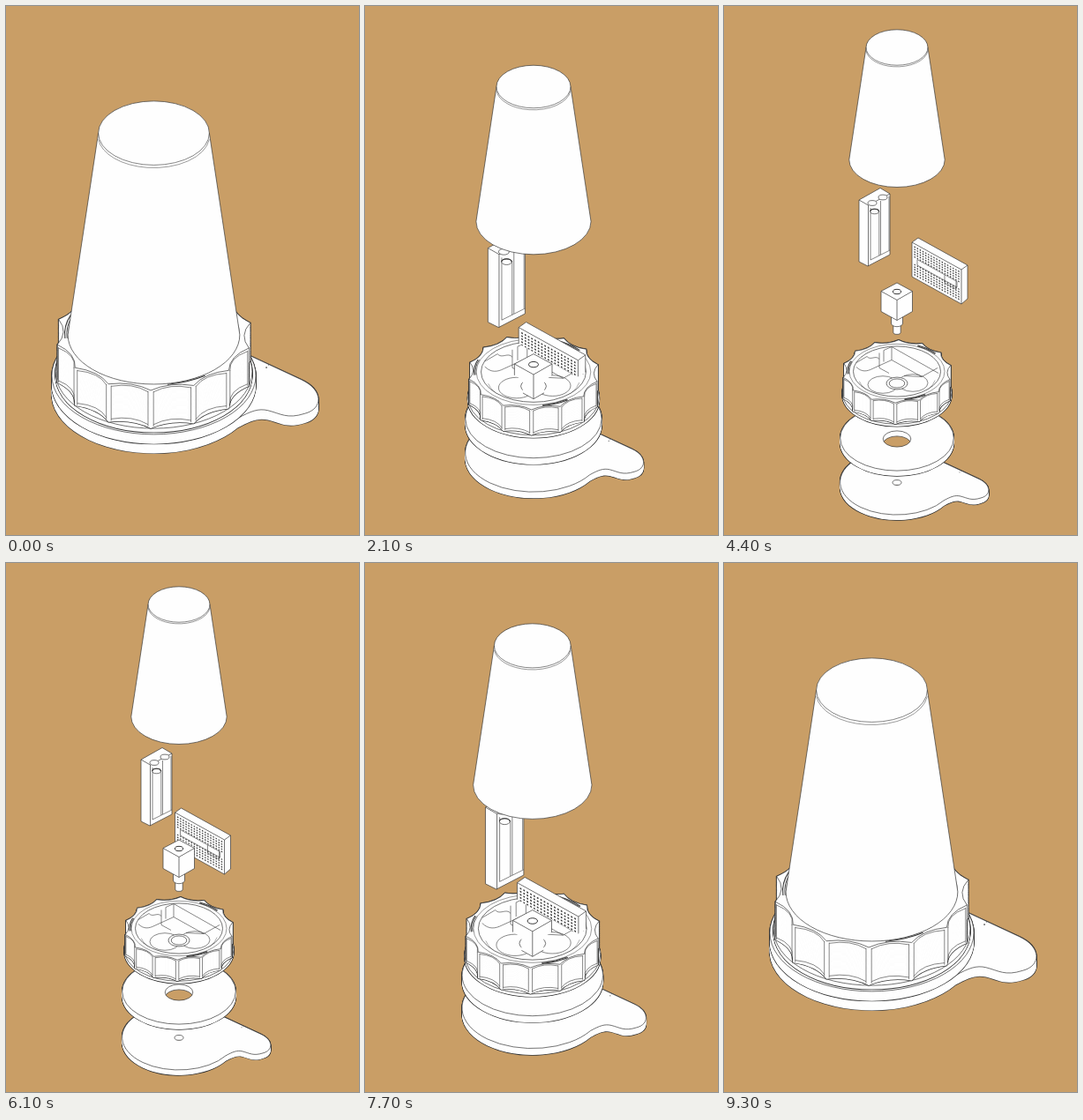
An HTML page with a canvas for the animation above (9800 ms loop, 400 by 600 pixels).

```html
<!DOCTYPE html>
<html lang="en">
<head>
<meta charset="utf-8">
<title>Exploded view</title>
<style>
  html, body { margin: 0; width: 100%; height: 100%; overflow: hidden; background: #c99e66; }
  canvas { display: block; width: 400px; height: 600px; }
</style>
</head>
<body>
<canvas id="stage" width="400" height="600"></canvas>
<script>
const c = document.getElementById('stage').getContext('2d');
const ISO = 0.577, INK = '#383838', PAPER = '#fefefe', TAU = Math.PI * 2;
const LINE = 0.7;

// step, axis x, scale, screen y of cone / ring / disk / base,
// then heights above the ring: battery, lamp, board slide, board
const KEYS = [
  [0, 167.5, 1.797, 372.9, 371.7, 419.2, 430, 2.6, -17, -31, -47],
  [10, 180, 1.525, 307.5, 399, 451.3, 477.8, 2.6, -17, -31, -47],
  [16, 189.8, 1.24, 251.7, 414.7, 467.7, 504.6, -36, -17, -31, -47],
  [20, 194.5, 1.083, 222.3, 416, 469.5, 512.8, -60, -17, -31, -47],
  [24, 196, 1, 198.5, 413, 467, 518.9, -84, -44, -31, -67],
  [30, 196, 1, 174.3, 414.5, 484.9, 537.4, -115.7, -100.5, -31, -130],
  [32, 196, 1, 174.3, 414.5, 486, 537.9, -116.5, -100.5, -21.5, -136.5],
  [36, 196, 1, 174.3, 414.5, 488.5, 539.2, -118.5, -100.5, -8, -146],
  [40, 196, 1, 174.3, 414.5, 490, 540, -119.5, -100.5, 0, -151.5]
];

function poseAt(n) {
  let i = 1;
  while (i < KEYS.length - 1 && KEYS[i][0] < n) i++;
  const a = KEYS[i - 1], b = KEYS[i], k = (n - a[0]) / (b[0] - a[0]);
  return a.map((v, j) => v + (b[j] - v) * k);
}

let scale = 1;
function place(x, y, s) {
  scale = s;
  c.setTransform(s, 0, 0, s, x, y);
}
function line(path, w = LINE) {
  c.lineWidth = w / scale;
  c.strokeStyle = INK;
  c.stroke(typeof path === 'string' ? new Path2D(path) : path);
}
function fill(path, rule = 'nonzero') {
  c.fillStyle = PAPER;
  c.fill(typeof path === 'string' ? new Path2D(path) : path, rule);
}
function solid(path) { fill(path); line(path); }

function oval(rx, x = 0, y = 0, from = 0, to = TAU) {
  const p = new Path2D();
  p.ellipse(x, y, rx, rx * ISO, 0, from, to);
  return p;
}

// Pull a flat outline down by a depth; the hole stays open
function extrude(outline, top, depth, hole) {
  const face = new Path2D(outline);
  if (hole) face.addPath(hole);
  const each = draw => {
    for (let d = depth; d >= 0; d -= 0.5) {
      c.save();
      c.translate(0, top + d);
      draw();
      c.restore();
    }
  };
  each(() => line(outline, LINE * 2));
  each(() => fill(face, 'evenodd'));
  c.save();
  c.translate(0, top);
  line(outline);
  if (hole) {
    line(hole);
    c.clip(hole);
    c.translate(0, depth);
    line(hole);
  }
  c.restore();
}

const plate = new Path2D('M49,-24 L93,-3.5 C107,3 107,15 95,18 C84,21.5 80,18 72,16 ' +
  'C66,14.5 61,16.5 53,20.9 A64.3,37.1 0 1 1 49,-24 Z');

function drawBase() {
  extrude(plate, 0, 6, oval(5, 0, 0.5));
  c.fillStyle = INK;
  c.fillRect(70.6, -11.5, 0.8, 0.8);
  c.fillRect(72, -13, 0.5, 0.5);
}

function drawDisk() {
  extrude(oval(64.3), 0, 6, oval(15.8, 0, 1));
}

// Grip ring with 14 concave panels; angles run from the front
const PANEL = TAU / 14, FIRST = -0.031;
const polar = (r, a) => [r * Math.sin(a), r * Math.cos(a) * ISO];

function scallop(p, k, r = 62, y = 0, start = true, inset = 0) {
  const a = FIRST + k * PANEL;
  const [x0, y0] = polar(r, a + inset), [x1, y1] = polar(r, a + PANEL - inset);
  const [mx, my] = polar(r - 8.4, a + PANEL / 2);
  if (start) p.moveTo(x0, y0 + y);
  p.quadraticCurveTo(mx, my + y, x1, y1 + y);
}

const grip = new Path2D();
for (let k = 0; k < 14; k++) scallop(grip, k, 62, 0, k === 0);
grip.closePath();

const ribs = new Path2D();
for (let k = -4; k < 4; k++) {
  if (k > -4) {
    for (const da of [-0.028, 0.028]) {
      const [x, y] = polar(61.6, FIRST + k * PANEL + da);
      ribs.moveTo(x, y + 0.8);
      ribs.lineTo(x, y + 23);
    }
  }
  if (k > -4 && k < 3) {
    scallop(ribs, k, 61.6, 1.2, true, 0.028);
    scallop(ribs, k, 61.6, 21.8, true, 0.028);
  }
}

const pocket = 'M-46,-10 L-34,-17 C-30,-12 -24,-19 -20,-14 M-20,-21 V-4 M-15,-24 V-11 ' +
  'M-6,-28 V-13 M-6,-28 L47,2 M-6,-13 L28,6 M-46,-5 C-40,1 -34,0 -28,-3 L-6,-13 ' +
  'M-20,-4 L-9,2 M8,5 L28,6 L46,-4 M-15,-24 L-6,-28';

function drawRing() {
  extrude(oval(62), 24, 2.5);
  extrude(grip, 0, 24);
  line(ribs, 0.6);
  line(oval(54), 0.5);
  line(oval(49.5));
  c.save();
  c.clip(oval(49.5));
  line(pocket, 0.6);
  line(oval(17, -16, 15), 0.6);
  line(oval(17, 18, 13), 0.6);
  line(oval(44, 0, 5, 0.2, 2.9), 0.4);
  c.restore();
  solid(oval(12, 0, 13.5));
  solid(oval(8.8, 0, 13.5));
  for (let k = 0; k < 3; k++) {
    const mid = Math.PI / 2 - 0.384 - k * TAU / 3;
    line(oval(56.2, 0, 0, mid - 0.23, mid + 0.23), 1.1);
    line(oval(54.9, 0, 0, mid - 0.23, mid + 0.23), 0.9);
  }
}

const boardSlot = new Path2D('M-24,-320 H120 V-6 H60 L41,5 L-24,-32.5 Z');

function drawBoard(slide, y) {
  c.save();
  if (slide < -30) c.clip(boardSlot);
  c.translate(17 + slide, y + 5);
  solid('M0,0 L7,-5 L63,26 V64 L56,70 L0,39 Z');
  line('M0,0 L56,31 L63,26 M56,31 V70');
  c.transform(56, 31, 0, 39, 0, 0);
  c.fillStyle = INK;
  for (let i = 0; i < 17; i++) {
    for (let j = 0; j < 10; j++) {
      const v = 0.075 + j * 0.073 + (j > 4 ? 0.15 : 0);
      c.fillRect(0.045 + i * 0.0555, v, 0.025, 0.036);
    }
  }
  c.fillStyle = PAPER;
  c.fillRect(0.1, 0.41, 0.8, 0.17);
  c.restore();
  c.save();
  if (slide < -30) c.clip(boardSlot);
  c.translate(17 + slide, y + 5);
  line('M6,19.5 L51,44.5 V51 L6,26 Z M37,37 V46 L50,53 V44', 0.6);
  c.restore();
}

function drawBattery(y) {
  c.save();
  c.translate(-33, y);
  solid('M0,0 L-10,-5 V-75 L14,-88.5 L25,-82 V-13 Z');
  line('M-10,-75 L0.5,-69 L25,-82 M0.5,-69 V0');
  line('M3,-66 V-7 L25,-18 M12.8,-63 V-12 M14.5,-74 V-13 M24,-79 V-18', 0.6);
  solid(oval(5, 5, -71.5));
  solid(oval(5, 17, -78));
  solid(oval(4.8, 7.6, -62));
  line(oval(4.8, 7.6, -62, Math.PI, TAU), 1.2);
  c.restore();
}

const wellTop = new Path2D('M-80,-320 H80 V13.5 H-80 Z');
wellTop.addPath(oval(8.8, 0, 13.5));
const cubeSeat = new Path2D('M-80,-320 H80 V3 H18 L10,8 V32 H-10 V8 L-18,3 H-80 Z');

function drawLamp(y) {
  c.save();
  c.clip(wellTop);
  c.translate(0, y);
  solid('M-4.2,44 V56 A4.2,2.4 0 0 0 4.2,56 V44');
  solid('M-6.5,34 V46 A6.5,3.7 0 0 0 6.5,46 V34');
  c.restore();
  c.save();
  c.clip(cubeSeat);
  c.translate(0, y);
  solid('M0,0 L17.5,9.5 V32.5 L0,42.5 L-18,32.5 V9.5 Z');
  line('M-18,9.5 L0,19.5 L17.5,9.5 M0,19.5 V42.5');
  line(oval(4.6, 0, 10), 1);
  c.restore();
}

function drawCone() {
  solid('M-35,-127.3 A35,20.2 0 0 1 35,-127.3 L54.2,0 A54.2,31.2 0 0 1 -54.2,0 Z');
  line(oval(35, 0, -127.3, 0, Math.PI), 0.6);
  line(oval(35.2, 0, -125.7, 0.12, Math.PI - 0.12), 0.5);
}

function render(n) {
  const [, x, s, cone, ring, disk, base, battery, lamp, slide, board] = poseAt(n);
  c.setTransform(1, 0, 0, 1, 0, 0);
  c.fillStyle = '#c99e66';
  c.fillRect(0, 0, 400, 600);
  place(x, base, s);
  drawBase();
  place(x, disk, s);
  drawDisk();
  place(x, ring, s);
  drawRing();
  if (n > 0) {
    drawBoard(slide, board);
    drawBattery(battery);
    drawLamp(lamp);
  }
  place(x, cone, s);
  drawCone();
}

let shown = -1;
function tick() {
  const t = performance.now() % 9800;
  const out = Math.floor((t - 400) / 100), back = 40 - Math.floor((t - 5300) / 100);
  const n = Math.max(0, Math.min(40, out, back));
  if (n !== shown) render(shown = n);
  requestAnimationFrame(tick);
}
tick();
</script>
</body>
</html>
```
